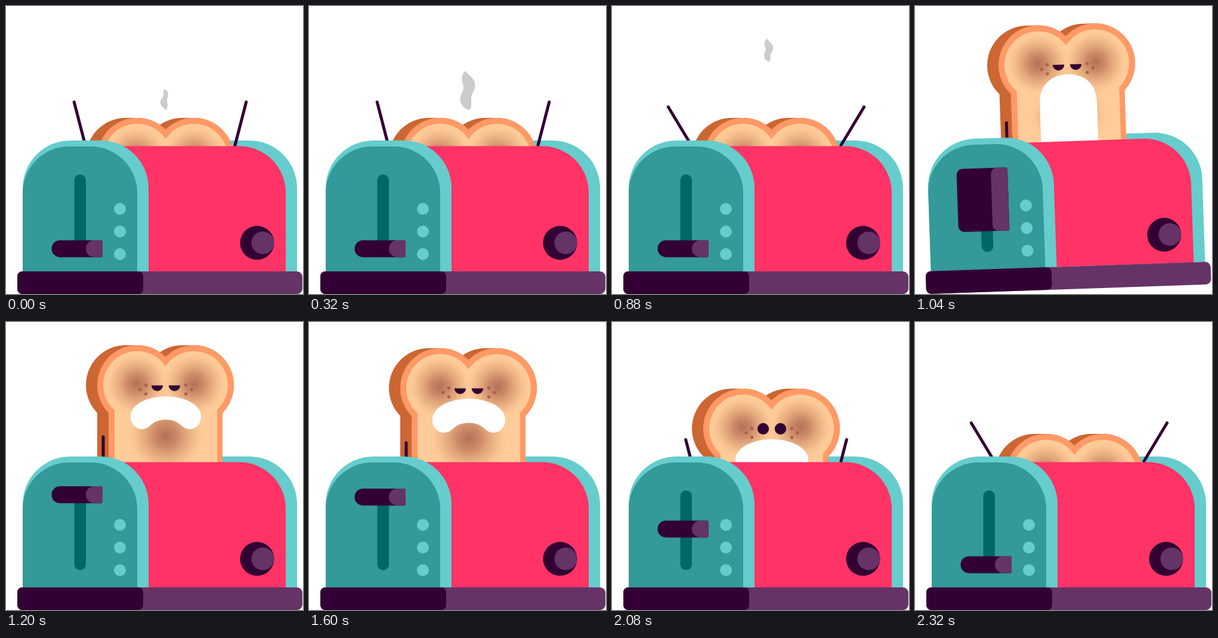
These frames come from a looping animation (498x484 px, 2.4 s). An HTML page:

```html
<!DOCTYPE html>
<html lang="en">
<head>
<meta charset="utf-8">
<title>Toaster</title>
<style>
  html, body { margin: 0; width: 100%; height: 100%; overflow: hidden; background: #fff; }
  svg { display: block; width: 100%; height: 100%; }
</style>
</head>
<body>
<svg viewBox="0 0 498 484">
  <defs>
    <radialGradient id="burn">
      <stop offset="0" stop-color="#b06850" stop-opacity=".92"/>
      <stop offset=".3" stop-color="#b87055" stop-opacity=".7"/>
      <stop offset=".7" stop-color="#d09068" stop-opacity=".28"/>
      <stop offset="1" stop-color="#ffcc99" stop-opacity="0"/>
    </radialGradient>
  </defs>

  <path id="smoke" fill="#ccc"/>

  <g id="scene">
    <path fill="#6cc" d="M300 446V226H408A80 80 0 0 1 488 306V446Z"/>

    <g stroke="#303" stroke-width="5" stroke-linecap="round">
      <line id="armL" x1="133" y1="234"/>
      <line id="armR" x1="384" y1="234"/>
    </g>

    <g id="toast">
      <path fill="none" stroke="#c63" stroke-width="134" stroke-linecap="round" d="M201 106H220M296 106H315"/>
      <rect x="153" y="110" width="40" height="180" fill="#c63"/>
      <g fill="#f96">
        <circle cx="220" cy="106" r="67"/>
        <circle cx="315" cy="106" r="67"/>
        <path d="M176 140Q172 149 172 158V290H363V158Q363 149 367 140Z"/>
      </g>
      <g fill="#fc9">
        <circle cx="220" cy="106" r="57"/>
        <circle cx="315" cy="106" r="57"/>
        <path d="M184 140Q182 145 182 156V290H354V156Q354 145 352 140Z"/>
      </g>
      <g fill="url(#burn)">
        <circle cx="219" cy="104" r="55"/>
        <circle cx="316" cy="104" r="55"/>
        <circle cx="268" cy="191" r="68"/>
      </g>
      <g id="freckles" fill="#a9644b"></g>
      <g fill="#303">
        <path id="eyeL" transform="translate(253.5 106.5)"/>
        <path id="eyeR" transform="translate(282.5 106.5)"/>
      </g>
      <path id="mouth" fill="#fff"/>
      <line id="sideArm" x1="163" x2="163" y2="260" stroke="#303" stroke-width="5" stroke-linecap="round"/>
    </g>

    <path fill="#f36" d="M150 446V235.500H391A78 78 0 0 1 469 313.500V446Z"/>
    <path fill="#6cc" d="M28 446V306A80 80 0 0 1 108 226H159A80 80 0 0 1 239 306V446Z"/>
    <path fill="#399" d="M28 446V314A78 78 0 0 1 106 236H142A78 78 0 0 1 220 314V446Z"/>
    <rect x="114.500" y="283" width="19.500" height="134" rx="9.750" fill="#066"/>
    <g fill="#6cc">
      <circle cx="191" cy="341" r="10"/>
      <circle cx="191" cy="379" r="10"/>
      <circle cx="191" cy="417" r="10"/>
    </g>
    <path id="lever" fill="#303"/>
    <path id="grip" fill="#636"/>
    <circle cx="421" cy="398" r="28.500" fill="#303"/>
    <circle cx="430.500" cy="398" r="19" fill="#636"/>
    <rect x="19" y="446" width="478" height="38" rx="9" fill="#636"/>
    <rect x="19" y="446" width="211" height="38" rx="8" fill="#303"/>
  </g>
</svg>
<script>
const LOOP = 2400, STEP = 80;
const $ = id => document.getElementById(id);
const set = (id, attrs) => {
  for (const name in attrs) $(id).setAttribute(name, attrs[name]);
};
const clamp = x => Math.min(1, Math.max(0, x));
const lerp = (a, b, k) => a + (b - a) * k;

// Piecewise linear value from [time, value] pairs
function track(keys, t) {
  const i = keys.findIndex(k => k[0] >= t);
  if (i === 0) return keys[0][1];
  if (i < 0) return keys[keys.length - 1][1];
  const [t0, v0] = keys[i - 1], [t1, v1] = keys[i];
  return lerp(v0, v1, (t - t0) / (t1 - t0));
}

// Blend two paths that share the same commands
function blend(a, b, k) {
  const to = b.match(/[\d.]+/g);
  let i = 0;
  return a.replace(/[\d.]+/g, n => lerp(+n, +to[i++], k).toFixed(2));
}

const PUFF_SMALL = 'M264 140C268 140 272 143 272 149C272 153 270 154 270 158C270 163 273 165 269 175' +
  'C264 172 259 168 259 162C259 156 264 154 264 150C264 147 264 146 264 144C264 142 264 141 264 140Z';
const PUFF_BIG = 'M260 78C266 94 285 98 285 117C285 132 275 138 274 150C273 162 275 166 270 175' +
  'C258 174 248 166 248 150C248 138 255 134 254 122C253 112 249 108 249 98C249 88 255 84 260 78Z';
const FROWN = 'M209 158C209 140 235 125 268 125C301 125 327 140 327 158C327 172 318 180 308 180' +
  'C293 180 293 164 268 164C243 164 243 180 228 180C218 180 209 172 209 158Z';
const YELL = 'M220 172C220 140 240 123 268 123C296 123 316 140 316 172C316 220 316 270 316 270' +
  'C293 270 293 270 268 270C243 270 243 270 220 270C220 270 220 220 220 172Z';

const BOUNCE = [[960, 149], [1040, 0], [1120, -14], [1200, 0], [1280, 8], [1360, 8], [1440, 5], [1680, 5]];
const SIDE_ARM = [[1040, 201], [1200, 193], [1360, 198]];

$('freckles').innerHTML = [-1, 1].map(side =>
  [[33.5, 106], [43, 113.5], [33.5, 121]].map(([x, y]) =>
    `<circle cx="${268 + side * x}" cy="${y}" r="2.7"/>`).join('')).join('');

function drawSmoke(t) {
  const k = clamp((t - 640) / 400);
  const s = 1 - k;
  set('smoke', {
    d: blend(PUFF_SMALL, PUFF_BIG, clamp(t / 640)),
    transform: `translate(${260 * k} ${78 * k - 39 * k}) scale(${s})`,
    display: k < 1 ? 'inline' : 'none'
  });
}

function drawArms(t) {
  const len = t < 1040 ? 75 : 75 * clamp((t - 2000) / 160);
  const flap = t < 1040 || t >= 2240 ? (1 - Math.cos(2 * Math.PI * t / 160)) / 2 : 0;
  const a = lerp(14.5, 31, flap) * Math.PI / 180;
  const reach = len > 36 ? len : len * .96;
  const dx = reach * Math.sin(a), y2 = 234 - reach * Math.cos(a);
  set('armL', { x2: 133 - dx, y2, display: len ? 'inline' : 'none' });
  set('armR', { x2: 384 + dx, y2, display: len ? 'inline' : 'none' });
}

function drawToast(t, drop) {
  set('toast', { transform: `translate(0 ${drop})` });
  const ry = 9.7 * clamp((t - 1680) / 160);
  const eye = `M-9.7 0A9.7 ${ry} 0 0 1 9.7 0A9.7 9.7 0 0 1 -9.7 0Z`;
  set('eyeL', { d: eye });
  set('eyeR', { d: eye });
  const s = lerp(1, 1.035, clamp((t - 1200) / 240));
  set('mouth', {
    d: blend(YELL, FROWN, clamp((t - 1040) / 160)),
    transform: `translate(268 152) scale(${s}) translate(-268 -152)`
  });
  set('sideArm', { y1: track(SIDE_ARM, t) });
}

function drawLever(t, drop) {
  const popping = t >= 1040 && t < 1120;
  const top = 276 + Math.max(drop, -4) * .79;
  const h = popping ? 106 : 28.5;
  const r = popping ? 10 : 14;
  const bar = x => `M${x + r} ${top}H159Q162 ${top} 162 ${top + 3}V${top + h - 3}` +
    `Q162 ${top + h} 159 ${top + h}H${x + r}A${r} ${r} 0 0 1 ${x} ${top + h - r}` +
    `V${top + r}A${r} ${r} 0 0 1 ${x + r} ${top}Z`;
  set('lever', { d: bar(76.5) });
  set('grip', { d: bar(134) });
}

function tilt(t) {
  if (t >= 1040 && t < 1120) return 'rotate(-1.95 19 484)';
  if (t >= 1120 && t < 1200) return 'rotate(1 497 484)';
  return '';
}

function draw(t) {
  const drop = t < 1680 ? track(BOUNCE, t) : 5 + 144 * clamp((t - 1680) / 560) ** 2.23;
  set('scene', { transform: tilt(t) });
  drawSmoke(t);
  drawArms(t);
  drawToast(t, drop);
  drawLever(t, drop);
}

const start = performance.now();
function tick() {
  const t = (performance.now() - start) % LOOP;
  draw(Math.floor(t / STEP) * STEP);
  requestAnimationFrame(tick);
}
tick();
</script>
</body>
</html>
```
